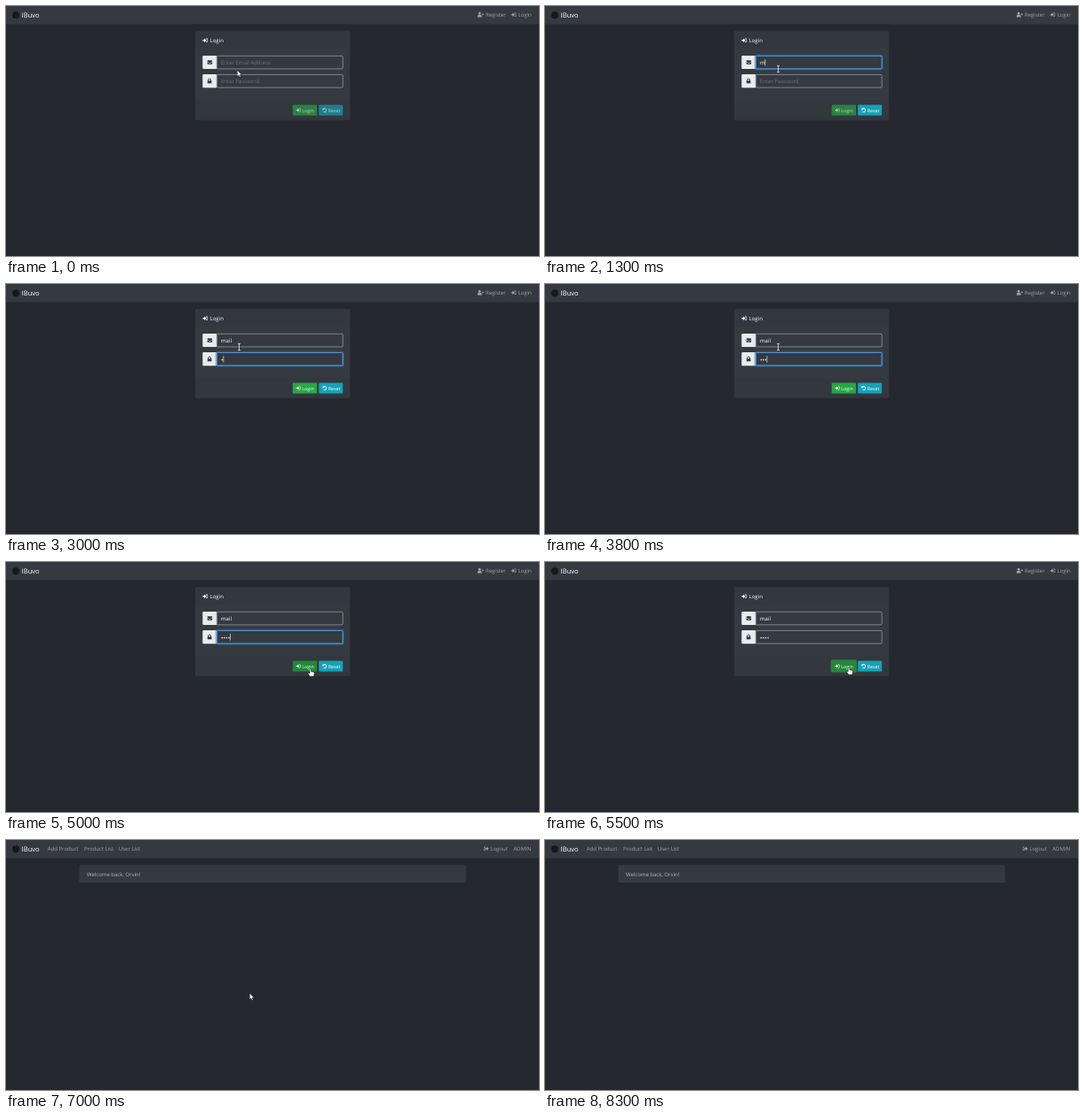
Write an HTML page that moves like this. It is 600 px wide and 282 px high and loops after 8800 ms.

```html
<!DOCTYPE html>
<html lang="en">
<head>
<meta charset="utf-8">
<title>Login demo</title>
<style>
  html, body { margin: 0; width: 100%; height: 100%; overflow: hidden; background: #25292f; }
  svg { display: block; width: 600px; height: 282px; }
  text { font: 6px "Open Sans", "Noto Sans", sans-serif; text-rendering: geometricPrecision; }
  .nav { fill: #a0a4a8; }
  .white { fill: #fff; }
  .brand { font-size: 7.6px; }
  .small { font-size: 5.3px; }
  .dots { font-size: 6.8px; }
  .hint { fill: #6c737a; }
  .panel { fill: #343a40; }
  .band { fill: #000; opacity: .04; }
  .box { fill: none; stroke: #92979c; stroke-width: .8; }
  .glow rect { fill: none; stroke: #4a90d0; stroke-width: .9; }
  .glow .halo { stroke: #007bff; stroke-opacity: .35; stroke-width: 1.4; }
  .caret { fill: #fff; }
  .pointer { fill: #fff; stroke: #111; stroke-width: .5; }
</style>
</head>
<body>
<svg viewBox="0 0 600 282">
  <defs>
    <symbol id="signIn" viewBox="0 0 16 16"><path d="M0 6.2h5V2l7 6-7 6V9.8H0zM10 2h3q3 0 3 3v6q0 3-3 3h-3v-2h3q1 0 1-1V5q0-1-1-1h-3z"/></symbol>
    <symbol id="signOut" viewBox="0 0 16 16"><path d="M16 8L9.5 2v4h-5v4h5v4zM6 2H3Q0 2 0 5v6q0 3 3 3h3v-2H3q-1 0-1-1V5q0-1 1-1h3z"/></symbol>
    <symbol id="mail" viewBox="0 0 16 16"><path d="M0 4q0-2 2-2h12q2 0 2 2v1l-8 5.5L0 5zM0 6.5L8 12l8-5.5V12q0 2-2 2H2q-2 0-2-2z"/></symbol>
    <symbol id="lock" viewBox="0 0 16 16"><path fill-rule="evenodd" d="M1.5 7H3V5a5 5 0 0 1 10 0v2h1.5v9h-13zM5.5 7h5V5a2.5 2.5 0 0 0-5 0z"/></symbol>
    <symbol id="undo" viewBox="0 0 16 16"><path d="M1 1v6h6L4.8 4.8A4.6 4.6 0 1 1 4.6 11.4L3 13A7 7 0 1 0 3 3z"/></symbol>
    <symbol id="addUser" viewBox="0 0 20 16"><path d="M7 8a4 4 0 1 0 0-8 4 4 0 0 0 0 8zM0 16v-2q0-5 5-5h4q5 0 5 5v2zM16 4h2v2.2h2v2h-2v2.2h-2V8.2h-2v-2h2z"/></symbol>
  </defs>

  <rect width="600" height="282" fill="#25292f"/>
  <rect class="panel" width="600" height="20.5"/>
  <circle cx="11" cy="10.3" r="4" fill="#16181b"/>
  <text class="white brand" x="17.6" y="12.6">IBuvo</text>

  <g id="loginPage">
    <g class="nav">
      <use href="#addUser" x="530.5" y="6.7" width="7.5" height="6"/>
      <text x="540" y="12">Register</text>
      <use href="#signIn" x="568.5" y="6.8" width="6" height="6"/>
      <text x="576.5" y="12">Login</text>
    </g>
    <rect class="panel" x="213" y="28.3" width="174.3" height="100.5" rx="1"/>
    <rect class="band" x="213" y="28.3" width="174.3" height="20"/>
    <rect class="band" x="213" y="106" width="174.3" height="22.8"/>
    <g class="white">
      <use href="#signIn" x="221.3" y="35.7" width="6" height="6"/>
      <text x="229.6" y="41">Login</text>
    </g>

    <g fill="#e9ecef">
      <rect x="221.3" y="55.9" width="16" height="15.2" rx="1"/>
      <rect x="221.3" y="77" width="16" height="15.2" rx="1"/>
    </g>
    <g fill="#343a40">
      <use href="#mail" x="226.4" y="60.5" width="6" height="6"/>
      <use href="#lock" x="226.2" y="81.6" width="5.8" height="5.8"/>
    </g>
    <rect class="box" x="237.2" y="56.3" width="142" height="14.6" rx="1"/>
    <rect class="box" x="237.2" y="77.4" width="142" height="14.6" rx="1"/>
    <g class="glow" id="mailGlow">
      <rect class="halo" x="236.2" y="55.3" width="144" height="16.6" rx="2"/>
      <rect x="237.2" y="56.3" width="142" height="14.6" rx="1"/>
    </g>
    <g class="glow" id="passGlow">
      <rect class="halo" x="236.2" y="76.4" width="144" height="16.6" rx="2"/>
      <rect x="237.2" y="77.4" width="142" height="14.6" rx="1"/>
    </g>
    <text class="hint" id="mailHint" x="242" y="66.2">Enter Email Address</text>
    <text class="hint" id="passHint" x="242" y="87.3">Enter Password</text>
    <text class="white" id="mailText" x="242" y="66.2"></text>
    <text class="white dots" id="passText" x="242" y="87.5"></text>
    <rect class="caret" id="caret" width=".6" height="7.4"/>

    <rect id="loginRing" x="321.6" y="110.3" width="29.6" height="14.2" rx="1.8" fill="#48b461" opacity=".5"/>
    <rect id="loginButton" x="322.7" y="111.4" width="27.4" height="12" rx="1"/>
    <g class="white" id="loginLabel">
      <use href="#signIn" x="326.3" y="114.8" width="5.4" height="5.4"/>
      <text class="small" x="333.3" y="119.6">Login</text>
    </g>
    <rect id="resetButton" x="352.2" y="111.4" width="27" height="12" rx="1"/>
    <g class="white" id="resetLabel">
      <use href="#undo" x="356" y="114.8" width="5.4" height="5.4"/>
      <text class="small" x="362.8" y="119.6">Reset</text>
    </g>
  </g>

  <g id="homePage">
    <g class="nav">
      <text x="46.8" y="12">Add Product</text>
      <text x="88" y="12">Product List</text>
      <text x="126.8" y="12">User List</text>
      <use href="#signOut" x="537.6" y="6.8" width="6" height="6"/>
      <text x="545.3" y="12">Logout</text>
      <text x="571.3" y="12">ADMIN</text>
    </g>
    <rect class="panel" x="82.5" y="28.3" width="435.3" height="19.6" rx="1"/>
    <text x="91" y="41" fill="#b4b7ba">Welcome back, Orvin!</text>
  </g>

  <g class="pointer" id="pointer">
    <path id="arrow" d="M0 0V7L1.6 5.6 2.7 8 4 7.4 2.9 5.1H5z"/>
    <path id="beam" d="M-1.5 -3.6H1.5M0 -3.6V3.6M-1.5 3.6H1.5" stroke="#fff" style="stroke-width:.7"/>
    <path id="hand" d="M-.8 .6Q0-.6 .8 .6V3L4 3.8Q4.8 4 4.6 5L4 8.5H-.3L-2.6 5.2Q-2.4 4.2-.8 5.2z"/>
  </g>
</svg>
<script>
const LOOP = 8800;
const $ = id => document.getElementById(id);

const start = {
  page: "login", mail: "", pass: "", mailFocus: 0, passFocus: 0, caret: null,
  login: "off", reset: "off", cursor: "arrow", at: [260.3, 72.3]
};

// Each step changes only the listed parts of the state.
const steps = [
  [300, { cursor: "beam", at: [262.5, 71] }],
  [800, { mailFocus: .5, caret: "mail" }],
  [1000, { mailFocus: 1 }],
  [1300, { mail: "m", reset: "on" }],
  [1500, { mail: "ma" }],
  [1800, { mail: "mai" }],
  [2000, { mail: "mail" }],
  [2300, { mailFocus: .15, passFocus: .5, caret: "pass" }],
  [2500, { mailFocus: 0, passFocus: 1 }],
  [2800, { caret: null }],
  [3000, { pass: "•", caret: "pass", login: "on" }],
  [3300, { pass: "••" }],
  [3800, { pass: "•••" }],
  [4000, { pass: "••••" }],
  [4500, { caret: null }],
  [4800, { cursor: "arrow", at: [366.5, 125] }],
  [5000, { cursor: "hand", at: [342.5, 120.5], login: "hover", caret: "pass" }],
  [5300, { at: [342, 118.6], login: "focus", passFocus: .5, caret: null }],
  [5500, { passFocus: 0 }],
  [5800, { page: "home", cursor: "arrow", at: [329.3, 152.8] }],
  [6000, { at: [325.3, 179.3] }],
  [6300, { at: [326, 180.8] }],
  [6800, { at: [301, 177] }],
  [7000, { at: [274.2, 172.8] }],
  [7300, { at: [33.3, 13.2] }],
  [7500, { at: [158.3, 111.3] }],
  [7800, { at: [221, 184] }],
  [8000, { at: [278.2, 248.8] }],
  [8300, { cursor: null }]
];

const loginFill = { off: "#2c8143", on: "#28a745", hover: "#218838", focus: "#218838" };
const resetFill = { off: "#217e8e", on: "#17a2b8" };

const set = (id, name, value) => $(id).setAttribute(name, value);
const show = (id, visible) => set(id, "visibility", visible ? "inherit" : "hidden");

function drawField(name, text, focus) {
  $(name + "Text").textContent = text;
  show(name + "Hint", !text);
  set(name + "Glow", "opacity", focus);
}

function draw(s) {
  set("loginPage", "visibility", s.page === "login" ? "visible" : "hidden");
  set("homePage", "visibility", s.page === "home" ? "visible" : "hidden");
  drawField("mail", s.mail, s.mailFocus);
  drawField("pass", s.pass, s.passFocus);

  show("caret", s.caret);
  if (s.caret) {
    const width = s[s.caret] ? $(s.caret + "Text").getComputedTextLength() : 0;
    set("caret", "x", 242 + width);
    set("caret", "y", s.caret === "mail" ? 60 : 81.1);
  }

  set("loginButton", "fill", loginFill[s.login]);
  set("loginLabel", "opacity", s.login === "off" ? .65 : 1);
  show("loginRing", s.login === "focus");
  set("resetButton", "fill", resetFill[s.reset]);
  set("resetLabel", "opacity", s.reset === "off" ? .65 : 1);

  for (const shape of ["arrow", "beam", "hand"]) show(shape, s.cursor === shape);
  set("pointer", "transform", `translate(${s.at})`);
}

function tick() {
  const t = performance.now() % LOOP;
  const passed = steps.filter(([time]) => time <= t).map(([, change]) => change);
  draw(Object.assign({}, start, ...passed));
  requestAnimationFrame(tick);
}
tick();
</script>
</body>
</html>
```
